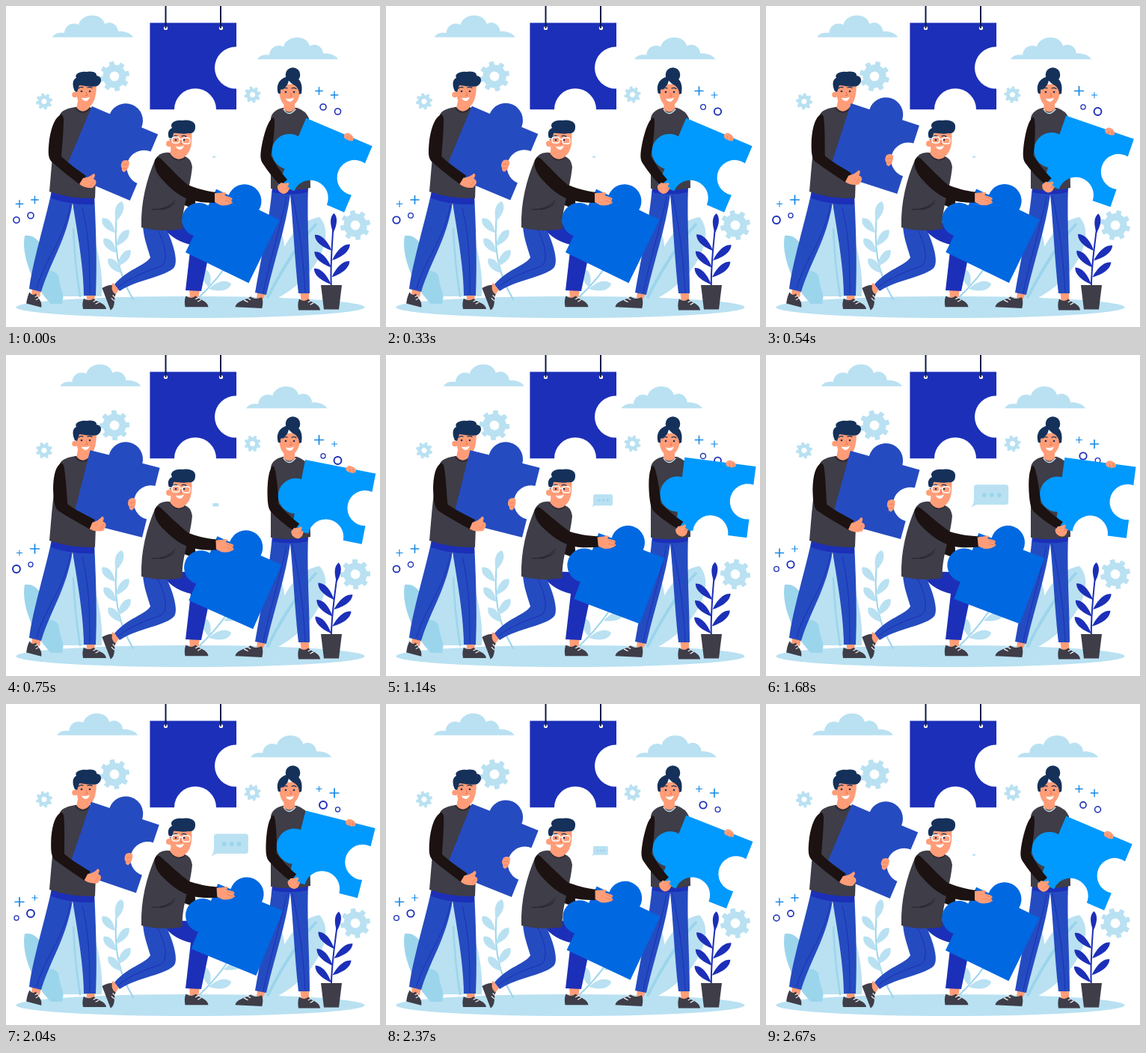
Write an HTML page that moves like this. It is 500 px wide and 429 px high and loops after 2.7 s.

```html
<!DOCTYPE html>
<html lang="en">
<head>
<meta charset="utf-8">
<title>Puzzle team</title>
<style>
html,body{margin:0;width:100%;height:100%;overflow:hidden;background:#fff}
svg{display:block;width:100vw;height:100vh}
.pale{fill:#b9e1f2}.mist{fill:#9bd5ec}
.navy{fill:#1c2fb8}.royal{fill:#254bc0}.azure{fill:#0068e1}.sky{fill:#0099fe}
.shirt{fill:#3e3d48}.sleeve{fill:#1b1211}.skin{fill:#ff9d78}.hair{fill:#15315a}
.line{fill:none;stroke-linecap:round;stroke-linejoin:round}
</style>
</head>
<body>
<svg viewBox="0 0 500 429" preserveAspectRatio="none">
<defs>
  <path id="cloud" class="pale" d="M62 41.7C65 36 72 35 78 36C79 26 88 21 97 25C101 9 128 8 132 24C141 19 149 25 150 34C159 33 167 37 170 41.7Z"/>
  <g id="shoe">
    <path class="shirt" d="M1 0C6 3 10 3 14 0C19 5 30 6 31 14H0C-1 9-1 4 1 0Z"/>
    <path class="line" d="M14 4l4-2M17 7l4-2" stroke="#fff" stroke-width="1.100"/>
  </g>
  <g id="face">
    <g class="hair"><circle cx="-4" cy="-1" r="1.300"/><circle cx="7" cy="-1" r="1.300"/></g>
    <path class="line" d="M-8-5q3-2.500 6-1M4-6q3-1.500 6 .5" stroke="#15315a" stroke-width="1.300"/>
    <path class="line" d="M2 0l2 4.500h-2.500" stroke="#e9704f" stroke-width=".9"/>
    <path d="M-4 7.500Q2 9 7 6.500Q5 12 1 12Q-3 11-4 7.500Z" fill="#fff"/>
  </g>
</defs>

<g id="cloudL"><use href="#cloud"/></g>
<g id="cloudR"><use href="#cloud" x="274" y="29.500"/></g>
<g id="gears"></g>
<ellipse class="pale" cx="246.500" cy="402.500" rx="233" ry="14.500"/>

<g id="bushes">
  <path class="pale" d="M56 392C47 352 51 327 66 316C79 334 80 370 76 392Z"/>
  <path class="mist" d="M60 398C35 372 20 332 25 307C46 304 53 330 57 354C73 352 80 376 75 398Z"/>
  <path class="pale" d="M77 388C61 342 66 288 88 268C114 282 131 340 128 388Z"/>
  <path class="line" d="M90 298Q92 345 99 388" stroke="#9bd5ec" stroke-width="2.500"/>
  <path class="pale" d="M344 390C335 350 345 310 367 300C379 326 370 366 350 390Z"/>
  <path class="pale" d="M345 390C360 338 382 288 419 282C441 305 418 360 364 390Z"/>
  <path class="line" d="M350 389C369 352 390 318 414 292" stroke="#9bd5ec" stroke-width="4"/>
  <path class="line" d="M170 392C148 356 143 318 149 270M252 395Q285 365 306 330" stroke="#9bd5ec" stroke-width="2"/>
</g>

<g id="plant"><path class="line" d="M435 377C433 350 436 320 438 287" stroke="#1c2fb8" stroke-width="2"/></g>
<path class="shirt" d="M421 373H449L445 405.500H425Z"/>

<g id="hanging">
  <path id="hung" class="navy"/>
  <g fill="#fff"><circle cx="213.500" cy="29.500" r="2.600"/><circle cx="287.500" cy="29.500" r="2.600"/></g>
  <path class="line" d="M213.500 0V29M287 0V29" stroke="#0d1a44" stroke-width="2"/>
</g>

<g id="sparks" class="line"></g>

<g id="bubble">
  <path class="pale" d="M282 173H321Q324.500 173 324.500 177V196Q324.500 200 321 200H281L274.500 203.500Q278 199 278 194V177Q278 173 282 173Z"/>
  <g class="mist"><circle cx="292" cy="187" r="3"/><circle cx="302" cy="187" r="3"/><circle cx="312" cy="187" r="3"/></g>
</g>

<g id="manL">
  <path class="skin" d="M35 377L47 379L45 389L34 387ZM107 384H119L118 396H109Z"/>
  <use href="#shoe" transform="translate(31 382) rotate(14) scale(.67 1.150)"/>
  <use href="#shoe" transform="translate(103 391)"/>
  <path class="royal" d="M61 247L118 250C120 295 122 340 120 387L104 387C104 350 95 300 89 263C80 315 60 340 47 382L31 378C36 340 52 290 61 247Z"/>
  <path class="navy" d="M61 247L118 252L118 265Q90 267 60 257Z"/>
  <path class="line" d="M86 266C78 312 52 338 41 377M102 270C112 310 112 350 112 385" stroke="#1c2fb8" stroke-width="1"/>
  <path class="shirt" d="M94 135C84 136 75 139 72 145C63 175 61 215 58 248Q86 258 119 257L123 145Q119 136 111 135Z"/>
  <path class="skin" d="M96 127L112 130L111 137Q103 145 94 137Z"/>
  <path class="line" d="M93 136Q102 147 112 137" stroke="#2c2b36" stroke-width="2"/>
  <path class="skin" d="M94 106C94 122 96 137 107 136.500C116 135 121 124 121 104Z"/>
  <circle class="skin" cx="92" cy="118.500" r="3.800"/>
  <path class="hair" d="M92 114C88 105 89 98 94 96C91 91 99 87 107 88C117 86 122 90 121 93C129 94 129 103 122 107C113 109 102 106 98 106L95 115Z"/>
  <use href="#face" x="105" y="115"/>
</g>
<g id="armL">
  <path id="pieceL" class="royal"/>
  <path class="sleeve" d="M74 145C66 148 61 160 58 178C56 196 56 204 62 209C73 219 85 228 99 239L107 227C96 219 83 210 74 201C75 186 77 168 77 152Q77 146 74 145Z"/>
  <path class="skin" d="M103 230Q112 229 117 224Q121 225 117 231Q122 233 120 238L116 243Q105 244 98 238Z"/>
  <path class="skin" d="M156 207Q163 204 165 209Q164 219 158 222Q154 221 155 217Q152 213 156 207Z"/>
  <path class="line" d="M157 212h5M157 217h4M113 240l4-5" stroke="#ed7958" stroke-width=".8"/>
</g>

<g id="manM">
  <path class="skin" d="M245 377L259 378L257 392H246ZM143 370L151 379L145 388L137 379Z"/>
  <use href="#shoe" transform="translate(239.500 387.500) scale(1 1.060)"/>
  <use href="#shoe" transform="translate(141.500 372) rotate(69) scale(1.020 1)"/>
  <path class="navy" d="M211 297C225 288 246 288 262 293Q275 304 271 333L261 381L240 380L247 319C234 316 220 309 211 297Z"/>
  <path class="royal" d="M183 294L213 296C222 312 231 340 225 349C216 361 174 366 152 381L145 372C162 352 186 347 193 336C189 322 184 310 183 294Z"/>
  <path class="line" d="M203 300C214 320 217 343 207 348C190 354 166 362 150 376" stroke="#1c2fb8" stroke-width="1"/>
  <path class="sleeve" d="M238 238L252 248L254 272L238 266Z"/>
  <path class="shirt" d="M219 196Q205 194 199 206C188 232 180 262 181 296Q208 303 236 298C234 272 246 246 249 215Q247 203 239 201Z"/>
  <path class="skin" d="M221 188L239 195L238 203Q229 209 219 199Z"/>
  <path class="line" d="M219 198Q228 210 239 203" stroke="#2c2b36" stroke-width="1.500"/>
  <path class="line" d="M195 272Q215 273 226 260M207 272Q220 270 225 264" stroke="#232129" stroke-width="1"/>
  <path class="skin" d="M219 168C218 188 221 204 234 203C244 201 250 190 248 167Z"/>
  <circle class="skin" cx="218" cy="184" r="4"/>
  <path class="hair" d="M219 179C215 171 217 165 222 163C218 157 226 152 235 153C246 151 254 155 253 162C253 168 249 171 244 170C236 172 228 169 224 170L222 179Z"/>
  <use href="#face" x="231" y="180"/>
  <g class="line" stroke="#fff" stroke-width="1.300"><rect x="222" y="175" width="10" height="8" rx="3"/><rect x="236" y="176" width="10" height="8" rx="3"/><path d="M232 178h4M222 178l-4-1"/></g>
</g>

<g id="woman">
  <path class="skin" d="M336 381L348 383L343 393H335ZM393 381H405L405 395H395Z"/>
  <use href="#shoe" transform="translate(343 389) rotate(3) scale(-1.150 1.080)"/>
  <use href="#shoe" transform="translate(391 391.500) scale(.94 1.080)"/>
  <path class="royal" d="M356 241L404 240C402 290 406 340 406 384L391 384C386 340 384 292 380 252C374 296 358 342 348 386L333 383C341 336 352 290 356 241Z"/>
  <path class="navy" d="M357 241L404 240L403 249Q380 254 356 249Z"/>
  <path class="line" d="M375 255C366 300 351 345 344 384M383 254C393 298 398 343 400 383" stroke="#1c2fb8" stroke-width="1"/>
  <path class="shirt" d="M370 136C361 138 355 143 354 150L354 244Q378 249 407 243L405 150Q401 140 389 136Z"/>
  <path class="skin" d="M372 126H386V138Q379 145 371 138Z"/>
  <path class="line" d="M371 138Q378 149 387 138" stroke="#c9e6f2" stroke-width="1.300"/>
  <circle class="hair" cx="383.500" cy="92" r="9.800"/>
  <path class="skin" d="M365 105C364 124 370 135 379 134.500C388 133 395 122 393 104Z"/>
  <path class="hair" d="M364 117C361 107 364 97 377 94C390 92 398 101 395 117L392 118Q392 110 386 106Q381 104 378 99C377 108 370 111 367 112L367 117Z"/>
  <use href="#face" x="378" y="116"/>
</g>
<g id="armR">
  <path id="pieceR" class="sky"/>
  <path class="sleeve" d="M357 149C351 153 347 164 343 181C340 196 339 204 343 210C350 221 358 231 367 240L376 232C368 223 360 211 354 200C357 186 359 167 359 156Q359 149 357 149Z"/>
  <path class="skin" d="M368 236Q373 238 377 236Q380 238 376 241Q381 243 378 246Q376 251 370 251Q362 248 363 240Z"/>
  <path class="skin" d="M452 172Q456 168 460 171Q466 174 464 180Q459 181 455 178Q451 177 452 172Z"/>
  <path class="line" d="M457 174l-1 4M461 175v4M374 244l5-1" stroke="#ed7958" stroke-width=".8"/>
</g>
<g id="armM">
  <path id="pieceM" class="azure"/>
  <path class="sleeve" d="M199 206C197 215 202 225 210 233C219 243 229 252 241 257C253 262 267 263 280 263L281 249C265 247 253 243 243 239C232 230 217 214 208 205Q203 199 199 206Z"/>
  <path class="skin" d="M279 250Q286 250 293 249Q296 250 292 253L301 256Q304 258 301 260L303 263Q296 268 286 266L279 262Z"/>
  <path class="line" d="M294 256l8 3M293 260l9 3" stroke="#ed7958" stroke-width=".8"/>
</g>
</svg>
<script>
const LOOP = 2700;
const $ = id => document.getElementById(id);

function add(parent, tag, attrs) {
  const e = document.createElementNS('http://www.w3.org/2000/svg', tag);
  for (const k in attrs) e.setAttribute(k, attrs[k]);
  parent.appendChild(e);
  return e;
}

// Edges run top, right, bottom, left. Each: sign (1 knob, -1 socket, 0 flat),
// shift along the edge, distance of the arc centre beyond the edge.
function setPiece(id, cx, cy, side, deg, r, edges) {
  const s = side / 2;
  let d = '';
  edges.forEach(([sign, shift = 0, out = 0], i) => {
    const p = (x, y) => {
      for (let k = 0; k < i; k++) [x, y] = [-y, x];
      return x + ' ' + y;
    };
    const half = Math.sqrt(r * r - out * out);
    d += (i ? 'L' : 'M') + p(-s, -s);
    if (sign) d += `L${p(shift - half, -s)}A${r} ${r} 0 ${out > 0 ? 1 : 0} ${sign > 0 ? 1 : 0} ${p(shift + half, -s)}`;
  });
  const e = $(id);
  e.setAttribute('d', d + 'Z');
  e.setAttribute('transform', `translate(${cx} ${cy}) rotate(${deg})`);
}
const flat = [0];
setPiece('hung', 250.2, 80.4, 115.6, 0, 28, [flat, [-1, 2.2, 1], [-1, -2.8], flat]);
setPiece('pieceL', 140.3, 197, 96, 23, 23, [[1, 1], [-1], flat, flat]);
setPiece('pieceR', 426.7, 212.7, 96, 23, 23.7, [flat, [-1, 0, 5], [-1, 1], [1, -2, 3]]);
setPiece('pieceM', 302.8, 307.5, 94, 26, 22.6, [[1, -6, 2], flat, flat, [1, 0, 3]]);

// Leaf with its base at x, y; deg 0 points up; widest near the tip.
function leaf(parent, cls, x, y, deg, len, w) {
  add(parent, 'path', {
    class: cls,
    d: `M0 0C${-w * .5} ${-len * .25} ${-w * 1.2} ${-len * .75} 0 ${-len}C${w * 1.2} ${-len * .75} ${w * .5} ${-len * .25} 0 0Z`,
    transform: `translate(${x} ${y}) rotate(${deg})`
  });
}
const plant = $('plant'), bushes = $('bushes');
leaf(plant, 'navy', 437.5, 303, 2, 26, 6);
for (let i = 0; i < 3; i++) leaf(plant, 'navy', 435.5 - i * .5, 327 + i * 22.5, -47, 31, 7);
for (let i = 0; i < 2; i++) leaf(plant, 'navy', 436 - i * .5, 340 + i * 22.5, 48, 32, 7);
leaf(bushes, 'pale', 147, 288, 16, 28, 8);
for (let i = 0; i < 3; i++) {
  const x = 146 + i * i * 2, y = 303 + i * 27;
  leaf(bushes, 'pale', x, y, -42, 26, 8);
  leaf(bushes, 'pale', x + 1, y + 18, 38, 28, 8);
}
leaf(bushes, 'pale', 271, 378, 78, 31, 9);
leaf(bushes, 'pale', 272, 377, -15, 27, 8);
leaf(bushes, 'pale', 291, 355, 70, 30, 8);

const gears = [[145, 94, 20, 1], [51, 127.5, 11, -1], [329.5, 118.5, 11, -1], [467, 293, 20, 1]]
  .map(([x, y, r, dir]) => {
    const g = add($('gears'), 'g', {});
    add(g, 'circle', { r: r * .55, fill: 'none', stroke: '#b9e1f2', 'stroke-width': r * .46 });
    for (let i = 0; i < 8; i++) add(g, 'rect', {
      class: 'pale', x: -r * .17, y: -r, width: r * .34, height: r * .4, rx: r * .06,
      transform: `rotate(${i * 45 - 12})`
    });
    return { g, x, y, dir };
  });

const sparks = [
  [424, 135, -1, 1], [443.5, 141, 1, 1], [14, 286, 1, 1], [33, 280, -1, 1],
  [418.5, 113.5, 1, 0], [439, 119, -1, 0], [18, 264.5, -1, 0], [38.5, 259, 1, 0]
].map(([x, y, sign, ring]) => {
  const e = ring
    ? add($('sparks'), 'circle', { r: 4, stroke: '#1c2fb8', 'stroke-width': 1.6 })
    : add($('sparks'), 'path', { d: 'M-4.7 0H4.7M0-4.7V4.7', stroke: '#1689e6', 'stroke-width': 1.4 });
  return { e, x, y, sign };
});

const ease = u => (1 - Math.cos(Math.PI * Math.min(1, Math.max(0, u)))) / 2;
const swing = (t, a, b, c, d) => ease((t - a) / (b - a)) - ease((t - c) / (d - c));
const move = (id, v) => $(id).setAttribute('transform', v);

function draw(now) {
  const t = now % LOOP, phase = t / LOOP * 2 * Math.PI;
  const drift = swing(t, 0, 1200, 1260, 2670);
  move('cloudL', `translate(${15 * drift} 0)`);
  move('cloudR', `translate(${-21.3 * drift} 0)`);
  move('armL', `rotate(${-8.8 * swing(t, 280, 760, 1380, 2670)} 69 146)`);
  move('armR', `rotate(${-15.7 * swing(t, 330, 960, 1600, 2550)} 353 150.5)`);
  move('armM', `rotate(${-5.4 * swing(t, 470, 1130, 1680, 2600)} 213 208)`);
  move('plant', `rotate(${3.8 * (1 - Math.cos(2 * phase)) / 2} 435 376)`);
  const size = .08 + .92 * swing(t, 500, 1750, 1990, 2650);
  move('bubble', `translate(276 203) scale(${size}) translate(-276 -203)`);
  for (const { g, x, y, dir } of gears)
    g.setAttribute('transform', `translate(${x} ${y}) rotate(${dir * 360 * t / LOOP})`);
  for (const { e, x, y, sign } of sparks)
    e.setAttribute('transform', `translate(${x} ${y}) scale(${1 + .24 * sign * Math.sin(phase)})`);
}
function tick(now) {
  draw(now);
  requestAnimationFrame(tick);
}
draw(0);
requestAnimationFrame(tick);
</script>
</body>
</html>
```
